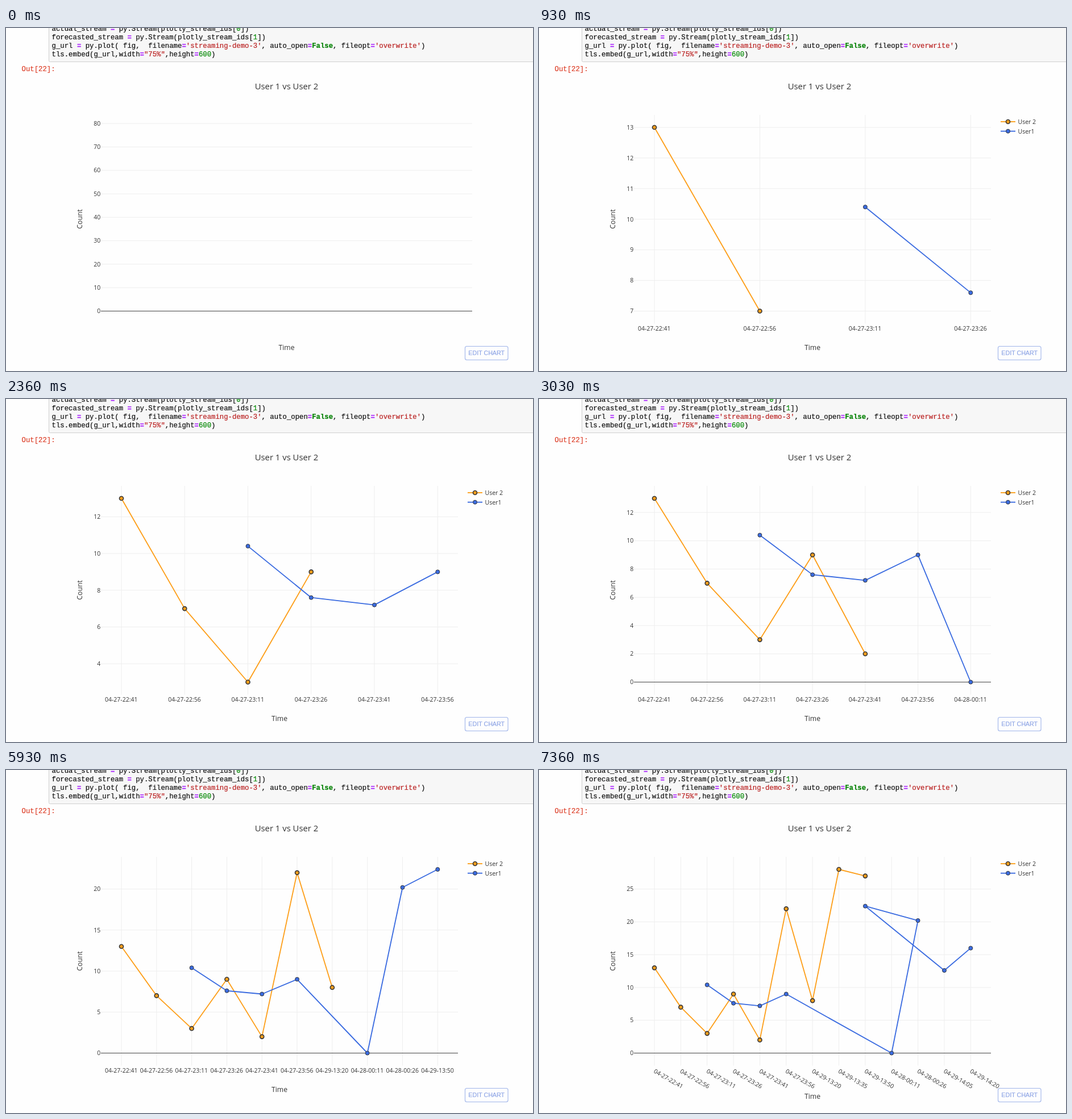
Write an HTML page that moves like this. It is 927 by 604 pixels and loops after 8 s.

```html
<!DOCTYPE html>
<html lang="en">
<head>
<meta charset="utf-8">
<title>Streaming chart</title>
<style>
  html, body { margin: 0; width: 100%; height: 100%; overflow: hidden; background: #fefefe; }
  svg { display: block; width: 927px; height: 604px; }
  text { font: 10.49px "Open Sans", sans-serif; fill: #333; white-space: pre; }
  .title { font-size: 14.86px; }
  .axis { font-size: 12.23px; }
  .mid { text-anchor: middle; }
  .end { text-anchor: end; }
  .code { font: 12.31px "Liberation Mono", monospace; fill: #111; stroke: #111; stroke-width: .2; }
  .str { fill: #ba2121; stroke: #ba2121; }
  .key { fill: #008000; stroke: #008000; font-weight: bold; }
  .op { fill: #aa22ff; stroke: #aa22ff; font-weight: bold; }
  .num { fill: #080; stroke: #080; }
  .out { fill: #dd3f28; stroke: #dd3f28; }
  .grid { stroke: #eee; stroke-width: 1; }
  .zero { stroke: #444; stroke-width: 1.1; }
  .edit { font: 10.7px "Liberation Sans", sans-serif; fill: #8fa6e6; stroke: #8fa6e6; stroke-width: .2; }
</style>
</head>
<body>
<svg viewBox="0 0 927 604">
  <rect x="75.5" y="-9.5" width="870" height="69" rx="2" fill="#f7f7f7" stroke="#cfcfcf"/>
  <g id="code"></g>
  <text class="code out" x="27.5" y="75.5">Out[22]:</text>
  <text class="title mid" x="493.5" y="108">User 1 vs User 2</text>
  <text class="axis mid" transform="translate(134 336.5) rotate(-90)">Count</text>
  <g id="chart"></g>
  <rect x="807.5" y="560.5" width="75.5" height="24" rx="3" fill="#fefefe" stroke="#9fb4ea" stroke-width="1.1"/>
  <text class="edit mid" x="845.2" y="576.3">EDIT CHART</text>
</svg>
<script>
const LOOP = 8000;
const updates = [200, 930, 1600, 2360, 3030, 3800, 5930, 6660, 7360];
const evening = ['04-27-23:11', '04-27-23:26', '04-27-23:41', '04-27-23:56'];
const traces = [
  { name: 'User 2', color: '#fd9f1b', rim: 1.7,
    x: ['04-27-22:41', '04-27-22:56', ...evening, '04-29-13:20', '04-29-13:35', '04-29-13:50'],
    y: [13, 7, 3, 9, 2, 22, 8, 28, 27] },
  { name: 'User1', color: '#3a6be0', rim: 1,
    x: [...evening, '04-28-00:11', '04-28-00:26', '04-29-13:50', '04-29-14:05', '04-29-14:20'],
    y: [10.4, 7.6, 7.2, 9, 0, 20.2, 22.4, 12.6, 16] }
];
const LEFT = 167, TOP = 153, BOTTOM = 520.5;
const X0 = 203, X1 = 759.3, Y0 = 498.5, Y1 = 175;

const line = (x1, y1, x2, y2, cls = 'grid') =>
  `<line class="${cls}" x1="${x1}" y1="${y1}" x2="${x2}" y2="${y2}"/>`;
const label = (x, y, text, cls = '', turn = 0) =>
  `<text class="${cls}" transform="translate(${x} ${y}) rotate(${turn})">${text}</text>`;
const path = (points, color) =>
  `<polyline points="${points.join(' ')}" fill="none" stroke="${color}" stroke-width="1.85" stroke-linejoin="round"/>`;
const marker = ([x, y], { color, rim }) =>
  `<circle cx="${x}" cy="${y}" r="3.5" fill="${color}" stroke="#383838" stroke-width="${rim}"/>`;

function yAxis(ticks, toY, right) {
  return ticks.map(v => line(LEFT, toY(v), right, toY(v), v ? 'grid' : 'zero') +
    label(LEFT - .7, toY(v) + 3.75, v, 'end')).join('');
}

function emptyChart() {
  const ticks = Array.from({ length: 9 }, (_, i) => i * 10);
  return yAxis(ticks, v => Y0 - v * 4.13, 820) + label(493.5, 567, 'Time', 'axis mid');
}

function chart(count) {
  if (!count) return emptyChart();
  const shown = traces.map(t => ({ ...t, x: t.x.slice(0, count), y: t.y.slice(0, count) }));
  const categories = [...new Set(shown.flatMap(t => t.x))];
  const values = shown.flatMap(t => t.y);
  const min = Math.min(...values), max = Math.max(...values);
  const toX = c => X0 + (X1 - X0) * categories.indexOf(c) / (categories.length - 1);
  const toY = v => Y0 + (Y1 - Y0) * (v - min) / (max - min);

  const perPixel = (max - min) / (Y0 - Y1);
  const low = min - (BOTTOM - Y0) * perPixel, high = max + (Y1 - TOP) * perPixel;
  const step = [.5, 1, 2, 5].find(s => s >= (high - low) / 10);
  const ticks = [];
  for (let i = Math.ceil(low / step); i * step <= high; i++) ticks.push(i * step || 0);

  const tilted = categories.length > 10;
  let svg = categories.map(c => line(toX(c), TOP, toX(c), BOTTOM) +
    (tilted ? label(toX(c) - 2, 532.6, c, '', 30) : label(toX(c) - .3, 533, c, 'mid'))).join('');
  svg += yAxis(ticks, toY, 795) + label(481, tilted ? 578.5 : 567, 'Time', 'axis mid');

  shown.forEach((t, i) => {
    const points = t.x.map((c, k) => [toX(c), toY(t.y[k])]);
    const y = 165 + i * 16.7;
    svg += path(points, t.color) + points.map(p => marker(p, t)).join('');
    svg += path([[812, y], [838, y]], t.color) + marker([825, y], t) + label(842.6, y + 3.8, t.name);
  });
  return svg;
}

const source = [
  'actual_stream = py.Stream(plotly_stream_ids[0])',
  'forecasted_stream = py.Stream(plotly_stream_ids[1])',
  "g_url = py.plot( fig,  filename='streaming-demo-3', auto_open=False, fileopt='overwrite')",
  'tls.embed(g_url,width="75%",height=600)'
];
const highlight = text => text.replace(/('.*?'|".*?")|(False)|(=)|\b\d+\b/g, (m, str, key, op) =>
  `<tspan class="${str ? 'str' : key ? 'key' : op ? 'op' : 'num'}">${m}</tspan>`);
document.getElementById('code').innerHTML =
  source.map((text, i) => label(80.6, 5.2 + i * 15, highlight(text), 'code')).join('');

const view = document.getElementById('chart');
let current = -1;
function tick() {
  const time = performance.now() % LOOP;
  const count = updates.filter(u => u <= time).length;
  if (count !== current) view.innerHTML = chart(current = count);
  requestAnimationFrame(tick);
}
tick();
</script>
</body>
</html>
```
